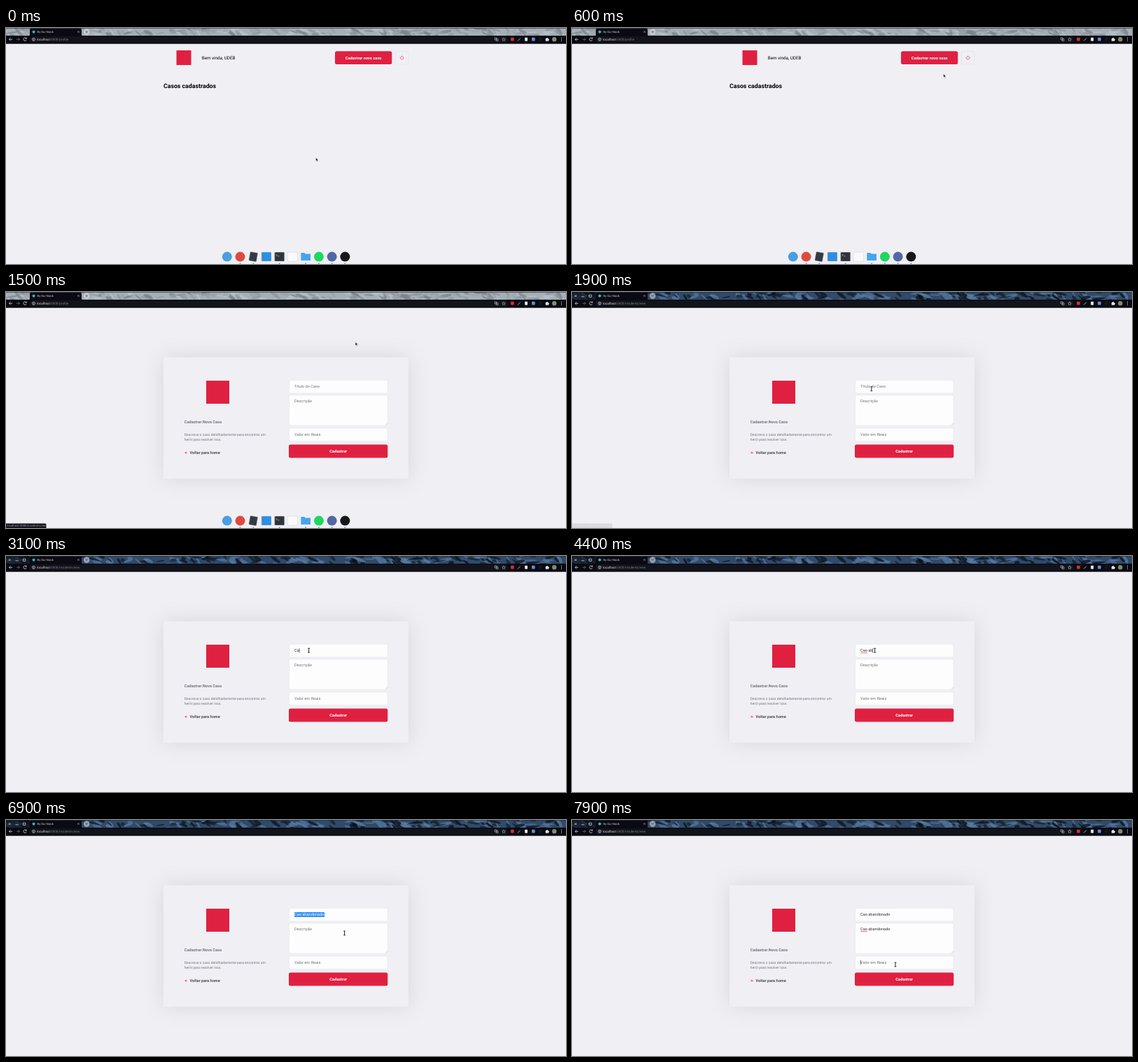
Animation, 800 px wide and 338 px high, one loop 8000 ms. Source, as an HTML page:

```html
<!DOCTYPE html>
<html lang="pt-BR">
<head>
<meta charset="utf-8">
<title>Cadastro de casos</title>
<style>
  html, body { margin: 0; height: 100%; overflow: hidden; background: #f0eff4; }
  svg { display: block; width: 100vw; height: 100vh; }
  text { font: 5.625px Roboto, sans-serif; text-rendering: geometricPrecision; white-space: pre; }
  .b { font-weight: 700; }
  .mid { text-anchor: middle; }
  .hint { fill: #757575; }
  .typed { fill: #333; }
  .field { fill: #fdfdfe; stroke: #dcdce6; stroke-width: .4; }
  .red { fill: #e02041; }
  .card { fill: #f0eff4; filter: drop-shadow(0 0 15.6px rgba(0, 0, 0, .1)); }
  .line { fill: none; stroke: #d5d7dc; stroke-width: .8; }
  .wrong { stroke: #e0304a; stroke-width: .7; }
  .caret { fill: #222; }
</style>
</head>
<body>
<svg viewBox="0 0 800 338">
  <rect width="800" height="338" fill="#f0eff4"/>

  <g id="profile">
    <rect class="red" x="243.5" y="32" width="21" height="21"/>
    <text x="279.8" y="44.8" style="font-size:6.25px">Bem vinda, UDEB</text>
    <rect id="newCase" class="red" x="470" y="33.2" width="81.25" height="18.75" rx="2.5"/>
    <text class="b mid" x="510.6" y="44.6" fill="#fff">Cadastrar novo caso</text>
    <rect x="556.4" y="33.4" width="18.4" height="18.4" rx="1.2" fill="none" stroke="#dcdce6" stroke-width=".4"/>
    <path d="M564.3 40.8a2.3 2.3 0 1 0 2.6 0M565.6 39.6v2.8" fill="none" stroke="#e02041" stroke-width=".6"/>
    <text class="b" x="225" y="86" style="font-size:8.75px">Casos cadastrados</text>
  </g>

  <g id="form">
    <rect class="card" x="225" y="93.6" width="350" height="173.6" rx="2.5"/>
    <rect class="red" x="286" y="127" width="33" height="33"/>
    <text class="b" x="254.8" y="188.1" fill="#737380">Cadastrar Novo Caso</text>
    <g fill="#737380">
      <text x="254.8" y="206.3" style="font-size:5px">Descreva o caso detalhadamente para encontrar um</text>
      <text x="254.8" y="212.7" style="font-size:5px">herói para resolver isso.</text>
    </g>
    <path d="M259 230.2h-3.2m1.5-1.5l-1.5 1.5 1.5 1.5" fill="none" stroke="#e02041" stroke-width=".7"/>
    <text x="262.6" y="232.2" fill="#333" style="font-weight:500">Voltar para home</text>
    <rect class="field" x="404.5" y="126.3" width="140.6" height="18.6" rx="2"/>
    <rect class="field" x="404.5" y="147.7" width="140.6" height="43.5" rx="2"/>
    <path d="M542.3 190.3l2-2m-.7 2l.7-.7" stroke="#888" stroke-width=".4"/>
    <rect class="field" x="404.5" y="194.9" width="140.6" height="18.6" rx="2"/>
    <rect class="red" x="404" y="218.5" width="141.3" height="18.9" rx="2.5"/>
    <text class="b mid" x="474.7" y="229.8" fill="#fff">Cadastrar</text>

    <text id="titleHint" class="hint" x="412" y="137.3">Título do Caso</text>
    <text id="bodyHint" class="hint" x="412" y="158.2">Descrição</text>
    <text class="hint" x="412" y="205.9">Valor em Reais</text>
    <rect id="selection" x="412" y="132" width="43" height="7" fill="#3490f5"/>
    <text id="title" class="typed" x="412" y="137.3"></text>
    <path id="titleWrong" class="wrong" d="M412.2 138.8h9.8"/>
    <g id="body">
      <text class="typed" x="412" y="158.2">Cao abandonado</text>
      <path class="wrong" d="M412.2 159.7h9.8"/>
    </g>
    <rect id="caret" class="caret" width=".6" height="6.8"/>
  </g>

  <g id="dock"></g>
  <g id="status">
    <path d="M0 331.6h56a1.5 1.5 0 0 1 1.5 1.5V338H0z" fill="#14161e"/>
    <text x="1.2" y="336.2" fill="#8e9096" style="font-size:4.3px">localhost:3000/incidents/new</text>
  </g>

  <g id="stripLight"></g>
  <g id="stripDark">
    <rect width="34" height="11" fill="#0c0f16" opacity=".7"/>
    <path d="M3.8 4.2l2.8 2.8m0-2.8l-2.8 2.8M13.5 6.8h4M24.5 4.2h3.4v3h-3.4z" class="line"/>
  </g>
  <path d="M32 11.5q2 0 2-2V2.5q0-2 2-2h70q2 0 2 2v7q0 2 2 2z" fill="#0a0a12"/>
  <circle cx="39.6" cy="5.6" r="2.1" fill="#3fa9bd"/>
  <text x="44.6" y="7.2" fill="#c9cbd0" style="font-size:4.2px">By Our Nook</text>
  <path d="M102.3 4.3l2.4 2.4m0-2.4l-2.4 2.4" class="line" style="stroke-width:.6"/>
  <circle id="newTab" cx="115.2" cy="5.6" r="4.3" fill="#c6ccd1"/>
  <path d="M113.2 5.6h4m-2-2v4" stroke="#555b62" stroke-width=".7"/>

  <rect y="11" width="800" height="11.7" fill="#0a0a12"/>
  <rect x="33" y="12" width="684" height="9" rx="4.5" fill="#12131b"/>
  <path class="line" d="M9 16.3H4.5m2-2l-2 2 2 2M29 15a2.2 2.2 0 1 0 .2 2M29.2 13.6v1.7h-1.7M41.5 16.3a2 2 0 1 0-4 0a2 2 0 1 0 4 0M39.5 15.6v1.8"/>
  <path class="line" d="M15 16.3h4.5m-2-2l2 2-2 2" style="stroke:#6c7078"/>
  <text x="44.2" y="18" fill="#e4e5e8" style="font-size:4.6px">localhost<tspan id="path" fill="#7d8088"></tspan></text>
  <g id="tools">
    <path d="M698.3 14h2.6v3h-2.6zM700.5 15.6h2.4v3h-2.4z" class="line" style="stroke-width:.6"/>
    <path d="M711 13.9l.7 1.6 1.7.2-1.3 1.1.4 1.7-1.5-.9-1.5.9.4-1.7-1.3-1.1 1.7-.2z" class="line" style="stroke-width:.5"/>
    <rect x="721" y="13.8" width="4.8" height="4.8" rx="1" fill="#d8283c"/>
    <path d="M731 18.5l3.8-3.8" class="line"/>
    <rect x="741.2" y="13.8" width="3.8" height="4.8" fill="#eef0f2"/>
    <rect x="751" y="13.8" width="4.8" height="4.8" rx="1" fill="#5a8fd6"/>
    <rect x="761" y="13.8" width="4.8" height="4.8" rx="1" fill="#14161d"/>
    <path d="M770.8 15h1.3v-1h1.6v1h1.4v1.2h.9v1.3h-.9v1.2h-4.3z" fill="#dfe1e5"/>
    <circle cx="783.3" cy="16.2" r="3.2" fill="#7f8f6c"/>
    <path d="M793.5 13.8v5" stroke="#dfe1e5" stroke-width="1" stroke-dasharray="1 1"/>
  </g>

  <g id="pointer" stroke-width=".6" stroke="#fff" fill="#1a1a1a">
    <path id="arrow" d="M0 0v5.4l1.3-1.1 .9 2 1-.5-.9-1.9h1.7z"/>
    <path id="hand" d="M-.6 0h1.2v2.6l2.4.7v2l-.7 1.6h-2.7l-2-2.6.6-.6 1.2.7z"/>
    <path id="beam" d="M-1.4-2.9h2.8M0-2.9v5.8M-1.4 2.9h2.8" stroke="#222" stroke-width=".95"/>
  </g>
</svg>
<script>
const $ = id => document.getElementById(id);
const LOOP = 8000, TICK = 100, PHRASE = 'Cao abandonado';

function add(parent, tag, attrs) {
  const node = document.createElementNS('http://www.w3.org/2000/svg', tag);
  for (const key in attrs) node.setAttribute(key, attrs[key]);
  return parent.appendChild(node);
}

// Mottled wallpaper seen through the tab strip
function wallpaper(group, base, shades) {
  let seed = 7;
  const random = () => (seed = seed * 16807 % 2147483647) / 2147483647;
  const layer = add(group, 'g', {});
  group.prepend(layer);
  add(layer, 'rect', { width: 800, height: 11, fill: base });
  for (let i = 0; i < 200; i++) {
    const x = random() * 800, y = random() * 11;
    add(layer, 'ellipse', {
      cx: x, cy: y, rx: 3 + random() * 7, ry: .8 + random() * 2,
      fill: shades[i % shades.length], opacity: .75,
      transform: `rotate(${random() * 80 - 20} ${x} ${y})`
    });
  }
  add(layer, 'rect', { width: 800, height: .9, fill: '#23272e', opacity: .6 });
}
wallpaper($('stripLight'), '#a5afb6', ['#8d969d', '#b6c0c7', '#99a3aa', '#79828a']);
wallpaper($('stripDark'), '#304a69', ['#0b111b', '#4f739c', '#141f2e', '#5a7ca3']);

// Dock: shape, colour and whether the app is running
[['circle', '#4a9fe0'], ['circle', '#dd4b3e', 1], ['tilted', '#343a44', 1], ['square', '#2d8fe0'],
 ['terminal', '#30353c', 1], ['square', '#fafafa'], ['folder', '#45a5ee', 1], ['circle', '#1ed760', 1],
 ['circle', '#5267a5', 1], ['circle', '#17171a', 1]].forEach(([shape, fill, running], i) => {
  const icon = add($('dock'), 'g', { transform: `translate(${315.8 + i * 18.73} 327.6)`, fill });
  if (shape === 'circle') add(icon, 'circle', { r: 7 });
  else if (shape === 'folder') add(icon, 'path', { d: 'M-6.8-5.5h5l1.3 1.5h7.3v9.5h-13.6z' });
  else add(icon, 'rect', {
    x: shape === 'tilted' ? -5.5 : -7, y: -6.5, height: 13, rx: 1.2,
    width: shape === 'tilted' ? 11 : 14,
    transform: shape === 'tilted' ? 'rotate(10)' : '',
    stroke: '#c9cbd2', 'stroke-width': .4
  });
  if (shape === 'terminal') add(icon, 'path', { d: 'M-5-3.8l1.6 1.3-1.6 1.3M-2.6-.9h2.4', class: 'line', style: 'stroke-width:.6' });
  if (running) add(icon, 'circle', { cy: 9.8, r: .9, fill: '#4a90d9' });
});

// Linear interpolation through [time, ...values] points
function track(points, t) {
  const i = points.findIndex(p => p[0] > t);
  if (i < 0) return points[points.length - 1].slice(1);
  if (i === 0) return points[0].slice(1);
  const a = points[i - 1], b = points[i], k = (t - a[0]) / (b[0] - a[0]);
  return a.slice(1).map((v, n) => v + (b[n + 1] - v) * k);
}

const pointerPath = [
  [0, 442.5, 185.5], [600, 530.5, 65.5], [800, 524, 45], [1300, 521, 45], [1500, 499, 71.5],
  [1800, 437, 132], [1900, 427.8, 138.8], [2200, 432.6, 135.2], [6500, 432.6, 135.2],
  [6900, 483.5, 162], [7300, 483.5, 162], [7800, 462, 207]
];
const keyTimes = [3000, 3100, 3400, 3600, 3900, 4400, 4500, 4600, 4700, 4900, 5100, 5200, 5300, 5500];
const FOCUS = 2800, SELECT = 6200, TO_BODY = 7100, PASTE = 7300, TO_VALUE = 7800;
const show = (id, on) => $(id).style.display = on ? '' : 'none';

function draw(t) {
  const onForm = t >= 1300, hovering = t >= 800 && t < 1400;
  show('profile', !onForm);
  show('form', onForm);
  $('newCase').style.filter = `brightness(${hovering ? .9 : 1})`;
  $('path').textContent = t < 1600 ? ':3000/profile' : ':3000/incidents/new';
  $('status').style.opacity = t < 1000 ? 0 : track([[1700, 1], [1900, .1], [2200, 0]], t)[0];

  const [focus] = track([[1500, 0], [1800, 1]], t);
  $('stripDark').style.opacity = focus;
  $('newTab').style.opacity = 1 - focus * .3;
  $('dock').setAttribute('transform', `translate(0 ${focus * 20})`);

  const count = keyTimes.filter(k => k <= t).length, selected = t >= SELECT && t < TO_BODY;
  $('title').textContent = PHRASE.slice(0, count);
  $('title').style.fill = selected ? '#fff' : '';
  show('titleHint', !count);
  show('titleWrong', count > 3 && !selected && t < TO_BODY);
  show('selection', selected);
  show('body', t >= PASTE);
  show('bodyHint', t < PASTE);

  const lastAction = Math.max(...[FOCUS, ...keyTimes, TO_BODY, PASTE, TO_VALUE].filter(k => k <= t));
  show('caret', t >= FOCUS && !selected && (t - lastAction) % 1200 < 600);
  const typedWidth = t >= TO_VALUE || t >= TO_BODY && t < PASTE || !count ? 0 : $('title').getComputedTextLength();
  $('caret').setAttribute('x', 412 + typedWidth);
  $('caret').setAttribute('y', t >= TO_VALUE ? 200.5 : t >= TO_BODY ? 152.8 : 132);

  $('pointer').setAttribute('transform', `translate(${track(pointerPath, t)})`);
  show('arrow', !hovering && t < 1800);
  show('hand', hovering);
  show('beam', t >= 1800);
}

function tick() {
  draw(Math.floor(performance.now() % LOOP / TICK) * TICK);
  requestAnimationFrame(tick);
}
tick();
</script>
</body>
</html>
```
